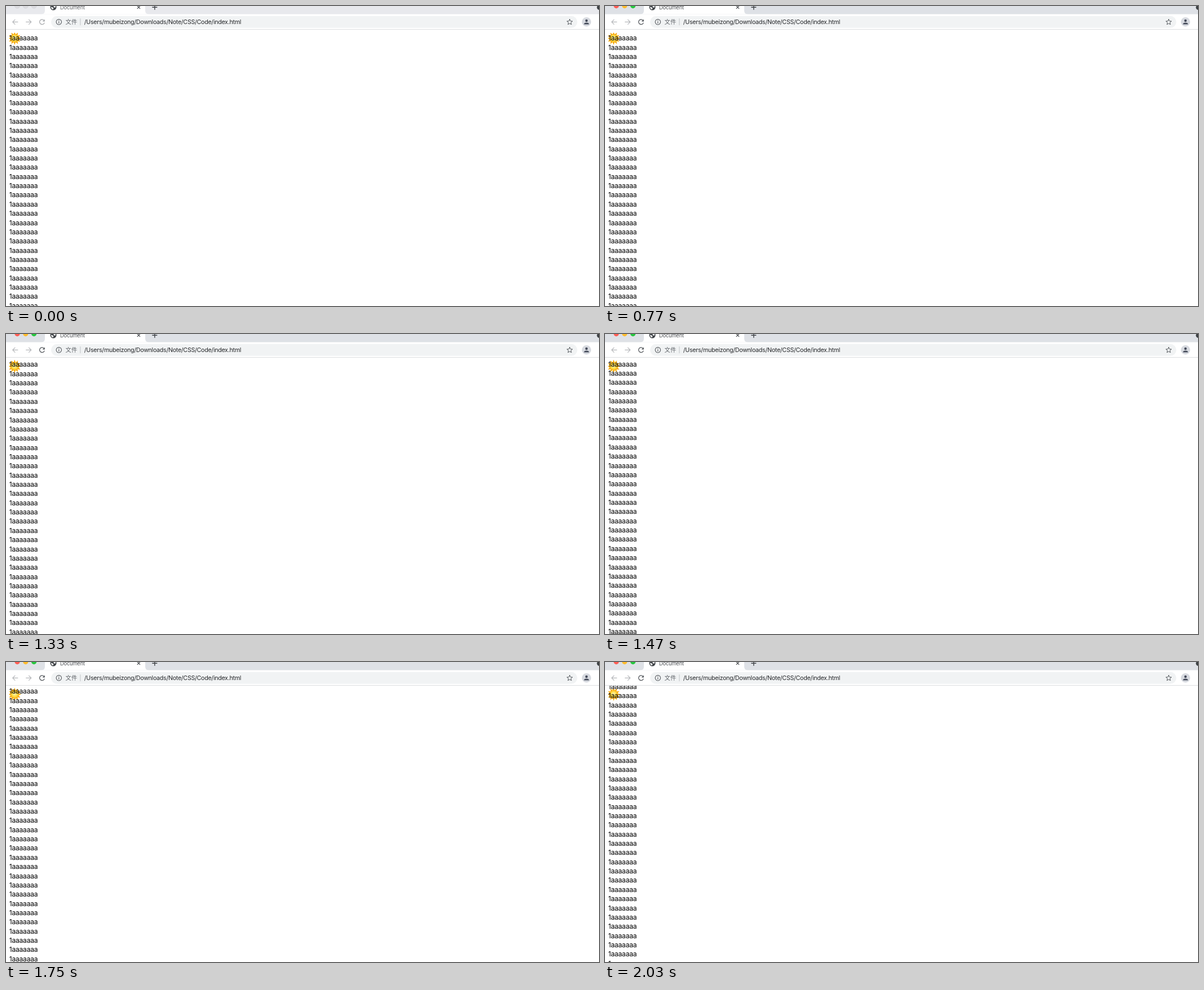
An HTML page with a canvas that plays this animation: 1052x532 px, repeating every 2.1 s.

```html
<!DOCTYPE html>
<html lang="zh">
<head>
<meta charset="utf-8">
<title>Document</title>
<style>
  html, body { margin: 0; width: 100%; height: 100%; overflow: hidden; background: #fff; }
  canvas { display: block; width: 1052px; height: 532px; }
</style>
</head>
<body>
<canvas id="stage"></canvas>
<script>
const W = 1052, H = 532, LOOP = 2100, TICK = 70;
const FONT = 'Inter, Roboto, sans-serif';
const canvas = document.getElementById('stage');
const ctx = canvas.getContext('2d');
const dpr = window.devicePixelRatio || 1;
canvas.width = W * dpr;
canvas.height = H * dpr;

function disc(x, y, r, fill, stroke) {
  ctx.beginPath();
  ctx.arc(x, y, r, 0, Math.PI * 2);
  ctx.fillStyle = fill;
  ctx.fill();
  if (stroke) {
    ctx.strokeStyle = stroke;
    ctx.lineWidth = 0.6;
    ctx.stroke();
  }
}

function line(d, color, width = 1.2) {
  ctx.strokeStyle = color;
  ctx.lineWidth = width;
  ctx.stroke(new Path2D(d));
}

function label(str, x, y, size, color, spacing = 0, family = FONT) {
  ctx.font = `${size}px ${family}`;
  ctx.letterSpacing = spacing + 'px';
  ctx.fillStyle = color;
  ctx.fillText(str, x, y);
}

function star(x, y, points, outer, inner) {
  ctx.beginPath();
  for (let i = 0; i < points * 2; i++) {
    const a = i * Math.PI / points - Math.PI / 2;
    const r = i % 2 ? inner : outer;
    ctx.lineTo(x + r * Math.cos(a), y + r * Math.sin(a));
  }
  ctx.closePath();
}

// Page offset: a short nudge, a rest, then a faster scroll.
function scrollAt(t) {
  if (t < 1260) return 0;
  if (t < 1750) return 3.8 - 1.5 * Math.pow(1 - Math.min(1, (t - 1260) / 280), 2);
  return 5 + (t - 1750) / 280 * 8.4;
}

function drawSun(scroll) {
  const x = 15.3, y = 57.3;
  ctx.save();
  ctx.beginPath();
  ctx.rect(5.7, 47.6 - scroll, W, H);
  ctx.clip();
  star(x, y, 12, 11.8, 7.3);
  ctx.fillStyle = '#f9ae17';
  ctx.fill();
  const glow = ctx.createRadialGradient(x, y - 1, 1, x, y, 7.2);
  glow.addColorStop(0, '#fff0a0');
  glow.addColorStop(0.6, '#ffdc45');
  glow.addColorStop(1, '#fbb31a');
  disc(x, y, 7.2, glow);
  ctx.restore();
}

function drawPage(scroll) {
  ctx.save();
  ctx.beginPath();
  ctx.rect(0, 42, W, H - 42);
  ctx.clip();
  drawSun(scroll);
  for (let i = 0; i < 32; i++) {
    label('1aaaaaaa', 5.8, 61.3 + i * 16.36 - scroll, 12, '#000', -0.2);
  }
  ctx.restore();
}

function drawTabs(active) {
  ctx.fillStyle = active ? '#dee1e6' : '#e8e9ed';
  ctx.fillRect(0, 0, W, 14.5);
  ctx.fillStyle = '#fff';
  ctx.fill(new Path2D('M63 14.5Q69 14.5 69 8V0H247V8Q247 14.5 253 14.5Z'));

  const lights = active ? ['#ff5f57', '#febc2e', '#28c840'] : Array(3).fill('#dcdce0');
  lights.forEach((c, i) => disc(20 + i * 14.8, -0.4, 4.6, c, active ? null : '#cfcfd3'));

  disc(84, 2, 5.5, '#3f4347');
  ctx.fillStyle = '#fff';
  ctx.fill(new Path2D('M80 1.5L83 2.5L84.5 4L83 6.3Q80 5 80 1.5ZM84 -1L87.5 -1L88 2L86 3L84.5 1Z'));
  label('Document', 96, 5.6, 9.2, active ? '#4a4d51' : '#606367', -0.1);
  line('M232.8 -0.4l5.2 5.2m0 -5.2l-5.2 5.2', '#44484c');
  line('M259.3 2.3h9m-4.5 -4.5v9', '#3f4347', 1.4);
  disc(1053, 2.5, 4.7, '#3c4043');
}

function drawToolbar(active) {
  const pale = '#b5b7ba', dark = '#55595e';
  line('M21.3 28.3H11.8m4.5 -4.5l-4.5 4.5l4.5 4.5', pale);
  line('M35.2 28.3h9.5m-4.5 -4.5l4.5 4.5l-4.5 4.5', pale);
  const reload = active ? dark : '#a9abae';
  line('M67.2 25.2A4.4 4.4 0 1 0 68.2 29.6', reload, 1.3);
  ctx.fillStyle = reload;
  ctx.fill(new Path2D('M68.8 23.4V27.6H64.6Z'));

  ctx.fillStyle = '#f1f3f4';
  ctx.beginPath();
  ctx.roundRect(80, 17.8, 933.5, 21, 10.5);
  ctx.fill();
  line('M89.1 28.3a4.7 4.7 0 1 0 9.4 0a4.7 4.7 0 1 0 -9.4 0M93.8 27.6v3.3M93.8 25.5v1.2', dark, 1.1);
  label('文件', 105.6, 32, 10.3, '#5f6368', 0, '"Noto Sans CJK SC", "Noto Sans CJK", sans-serif');
  line('M131.9 22.2v12', '#bfc2c6', 1);
  label('/Users/mubeizong/Downloads/Note/CSS/Code/index.html', 138.8, 32, 10.7, '#26282b', -0.3);

  star(1000, 28.6, 5, 5.3, 2.3);
  ctx.strokeStyle = dark;
  ctx.lineWidth = 1;
  ctx.stroke();

  disc(1029.8, 28.3, 8.2, '#d7dae0');
  disc(1029.8, 26, 2.2, '#454b5a');
  ctx.fillStyle = '#454b5a';
  ctx.fill(new Path2D('M1025.3 32.5Q1025.3 29.4 1029.8 29.4T1034.3 32.5Z'));
  ctx.fillStyle = '#dcdee1';
  ctx.fillRect(0, 41, W, 1);
}

function draw(now) {
  const t = Math.floor(now % LOOP / TICK) * TICK;
  const active = t >= 700;
  ctx.setTransform(dpr, 0, 0, dpr, 0, 0);
  ctx.fillStyle = '#fff';
  ctx.fillRect(0, 0, W, H);
  drawPage(scrollAt(t));
  drawTabs(active);
  drawToolbar(active);
}

const start = performance.now();
function loop() {
  draw(performance.now() - start);
  requestAnimationFrame(loop);
}
loop();
</script>
</body>
</html>
```
